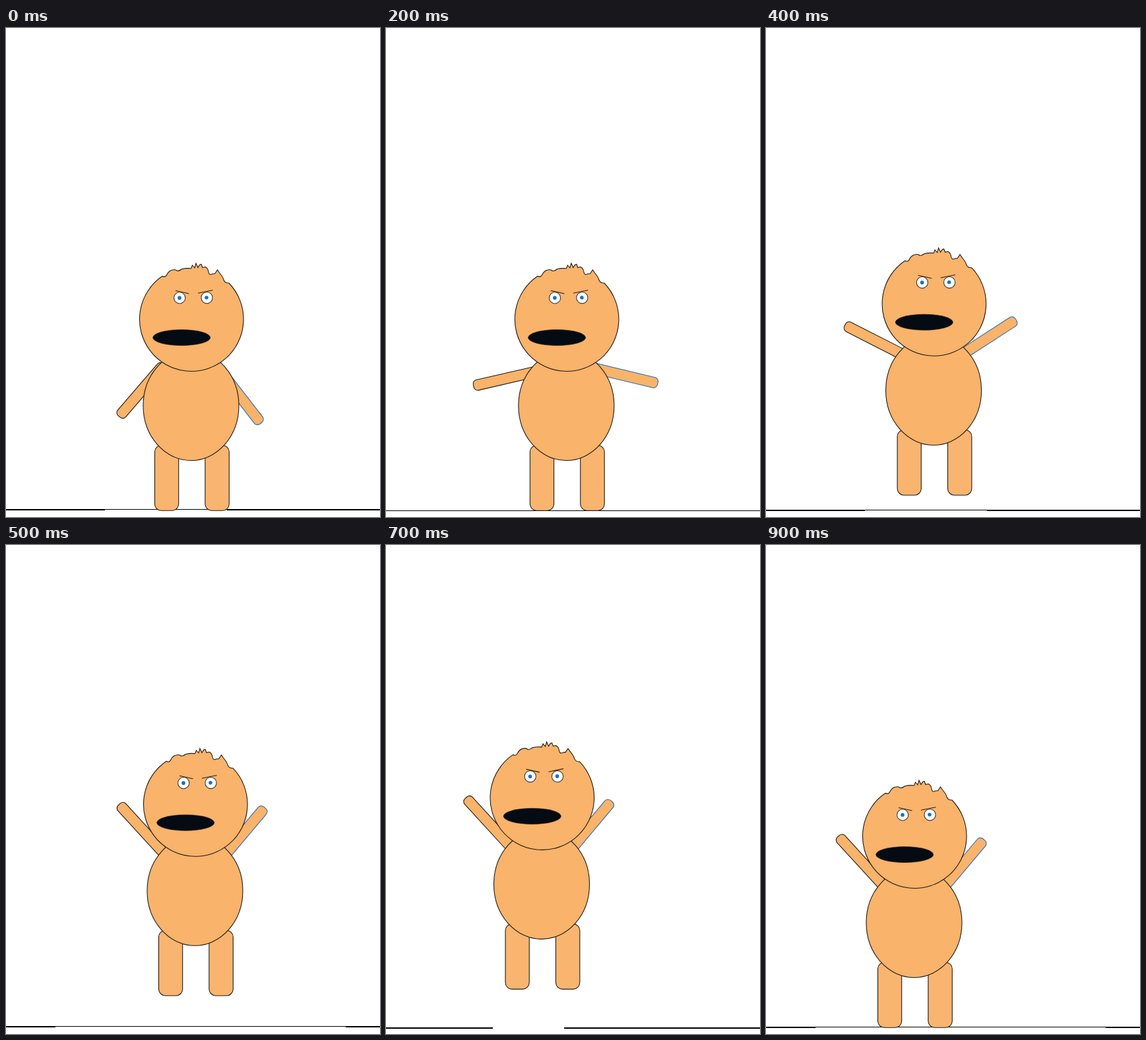
Animation, 567 px wide and 740 px high, one loop 1 s. Source, as an HTML page:

```html
<!DOCTYPE html>
<html lang="en">
<head>
<meta charset="utf-8">
<title>Jumping figure</title>
<style>
  html, body { margin: 0; width: 100%; height: 100%; overflow: hidden; background: #fff; }
  svg { display: block; }
  .skin { fill: #f9b36a; stroke: #1c1a18; stroke-width: 1.1; }
  .leg { fill: #f9b56f; }
  .blue { stroke: #2b6cb4; }
  .eye { fill: #fff; stroke: #3c3c3c; stroke-width: 1.1; }
  .pupil { fill: #1f6fbf; }
  .brow { fill: none; stroke: #2a2018; stroke-width: 1.1; }
  .mouth { fill: #050b13; stroke: #2b1c12; stroke-width: .6; }
</style>
</head>
<body>
<svg width="567" height="740" viewBox="0 0 567 740">
  <path id="ground" shape-rendering="crispEdges"/>
  <g id="figure">
    <rect id="armL" class="skin" x="-10" y="-8" width="104" height="16" rx="6"/>
    <rect id="armR" class="skin blue" x="-10" y="-8" width="104" height="16" rx="6"/>
    <rect class="skin leg" x="225.5" y="631.5" width="36.2" height="98.7" rx="10"/>
    <rect class="skin leg" x="301.9" y="631.5" width="36.4" height="98.7" rx="10"/>
    <ellipse class="skin" cx="280.5" cy="571.5" rx="72.5" ry="83"/>
    <path class="skin" d="M237 375.5 Q242 378 244 373 Q247 367 253 366 Q257 365 259.5 367.5 Q263 368 266 365
      Q274 363 280.5 364 L282.5 359 L286 363 L288 356 L291 362.5 L293.5 358.5 L296 357.5 L298 362.5 L302 361.5
      Q306 363 307 369 Q308 375 313 372 L316.5 372 L320.5 366 L324 371 Q329 377 330 381
      Q332 386.5 338 386 A78.8 78.8 0 1 1 237 375.5Z"/>
    <circle class="eye" cx="263.2" cy="408.4" r="8.6"/>
    <circle class="eye" cx="304.5" cy="408.3" r="8.6"/>
    <circle class="pupil" cx="263" cy="408.4" r="2.8"/>
    <circle class="pupil" cx="304" cy="408" r="2.8"/>
    <path class="brow" d="M257 397.5 L277.5 402 M291 401.3 L313.5 396.7"/>
    <ellipse class="mouth" cx="266.2" cy="468.5" rx="43.6" ry="12"/>
  </g>
</svg>
<script>
  const STEP = 100, STEPS = 10, WIDTH = 567;
  const LIFT = 2, TOP = 6, LAND = 9, HEIGHT = 81;
  const { PI, sin, cos, min, max, round } = Math;

  const el = id => document.getElementById(id);
  const ground = el('ground'), figure = el('figure'), armL = el('armL'), armR = el('armR');
  const clamp = v => min(1, max(0, v));
  const mix = (a, b, p) => a + (b - a) * p;

  // sideways sway: [step, x]
  const sway = [[0, 0], [1, -9.3], [3, -5], [4, -26.4], [5, 6], [7, -44.5], [LAND, -56]];

  function swayAt(s) {
    const n = max(1, sway.findIndex(([t]) => t >= s));
    const [t0, x0] = sway[n - 1], [t1, x1] = sway[n];
    return mix(x0, x1, (s - t0) / (t1 - t0));
  }

  function jumpAt(s) {
    const rise = clamp((s - LIFT) / (TOP - LIFT)) ** 1.8;
    const fall = clamp((s - TOP) / (LAND - TOP)) ** 1.15;
    return HEIGHT * (fall - rise);
  }

  function place(arm, x, y, angle) {
    arm.setAttribute('transform', `translate(${x} ${y}) rotate(${angle})`);
  }

  // both arms swing up over the first half of the loop
  function swing(s) {
    const p = clamp(s / 5), bow = sin(PI * p);
    place(armL, 233 - 3.8 * p, 516.7 - 6.7 * p + 7 * bow, mix(130.8, 227.5, p ** 1.07));
    place(armR, 328.8 - 3 * p, 523.7 - 6 * p - 5.5 * bow,
      mix(52.2, -49.9, p - .035 * sin(2 * PI * p)));
  }

  // the line thins out from the middle over three steps, then breaks on the fourth
  function floorPath(s) {
    const k = s % 4, y = round(729.4 - 1.3 * cos(2 * PI * s / 5));
    const bar = (a, b, h) => a < b ? `M${a} ${y}H${b}v${h}H${a}Z` : '';
    if (k === 3) return bar(0, 162, 2) + bar(270, WIDTH, 2);
    return bar(0, WIDTH, 1) + bar(0, 150 - 75 * k, 2) + bar(335 + 180 * k, WIDTH, 2);
  }

  function draw(ms) {
    const s = Math.floor(ms / STEP) % STEPS;
    figure.setAttribute('transform', `translate(${swayAt(s)} ${jumpAt(s)})`);
    swing(s);
    ground.setAttribute('d', floorPath(s));
  }

  let start;
  function tick(now) {
    start ??= now;
    draw(max(0, now - start));
    requestAnimationFrame(tick);
  }
  draw(0);
  requestAnimationFrame(tick);
</script>
</body>
</html>
```
